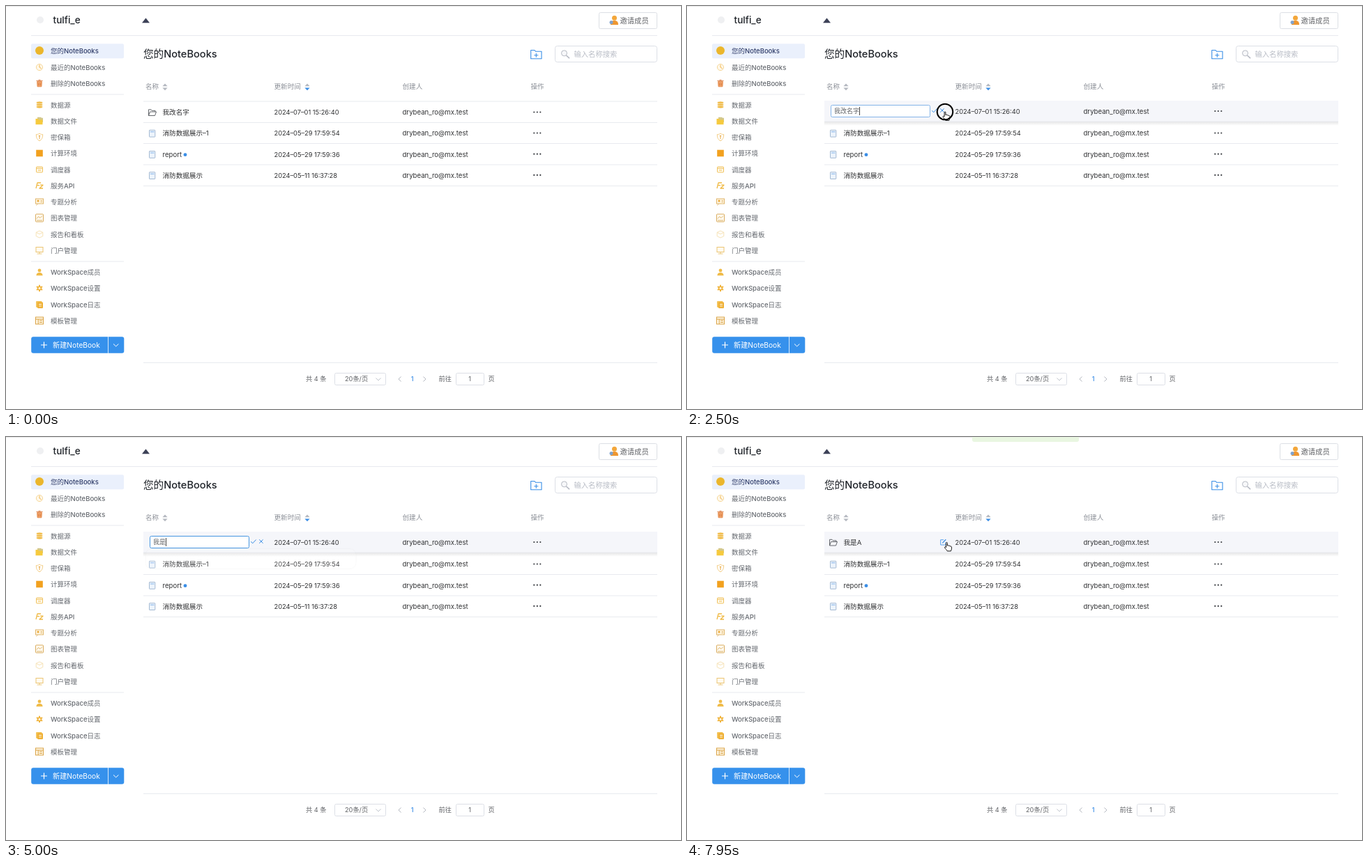
An HTML page for the animation above (8000 ms loop, 968 px wide and 579 px high).

```html
<!DOCTYPE html>
<html lang="zh-CN">
<head>
<meta charset="utf-8">
<title>NoteBooks</title>
<style>
html, body { margin: 0; width: 100%; height: 100%; overflow: hidden; background: #fff; }
svg { display: block; width: 968px; height: 579px; }
text { font-family: Inter, "Noto Sans CJK SC", "Noto Sans CJK", "Noto Sans", sans-serif; }
</style>
</head>
<body>
<svg id="stage" viewBox="0 0 968 579" fill="none"></svg>
<script>
const BLUE = '#3a8ee6', GOLD = '#f0bb48', LOOP = 8000;
const stage = document.getElementById('stage');

// Markup helpers; cy is the vertical middle of the text
const text = (x, cy, s, size = 9.6, fill = '#303133', more = '') =>
  `<text x="${x}" y="${cy + size * 0.36}" font-size="${size}" fill="${fill}" ${more}>${s}</text>`;
const rect = (x, y, w, h, fill, r = 0, stroke = 'none', more = '') =>
  `<rect x="${x}" y="${y}" width="${w}" height="${h}" rx="${r}" fill="${fill}" stroke="${stroke}" ${more}/>`;
const path = (d, stroke, w = 1, fill = 'none') =>
  `<path d="${d}" stroke="${stroke}" stroke-width="${w}" fill="${fill}" stroke-linejoin="round"/>`;
const dot = (x, y, r, fill, stroke = 'none') =>
  `<circle cx="${x}" cy="${y}" r="${r}" fill="${fill}" stroke="${stroke}"/>`;
const hline = (x1, x2, y, c = '#e8eaef') => path(`M${x1} ${y}H${x2}`, c);
const group = (id, body) => `<g id="${id}">${body}</g>`;
const at = (x, y, body) => `<g transform="translate(${x} ${y})">${body}</g>`;

// Sidebar icons, each centred on 0,0
const icons = {
  note: dot(0, 0, 6, '#ebb62c'),
  recent: dot(0, 0, 4.6, '#fff8ea', '#f6d798') + path('M0-3.5V0L2.8 2', '#f0b64d'),
  trash: path('M-3.3-2.3H3.3L2.9 4.8H-2.9Z', '#e58b4b', 1, '#eda068') + path('M-4.6-3.6H4.6M-1.5-4.7H1.5M-1.2 0V2.8M1.2 0V2.8', '#d9773a', 0.9),
  data: [-3, 0, 3].map(y => `<ellipse cx="0" cy="${y}" rx="4.5" ry="1.9" fill="${GOLD}" stroke="#fff" stroke-width=".5"/>`).join(''),
  files: path('M-3-5.2H2L3-4.2H5V2H-3Z', 'none', 0, '#d3c88c') + path('M-5.5-3H-2L-1-1.6H4.5V5.3H-5.5Z', 'none', 0, '#f6ca3e'),
  safe: path('M0-5.2C2-4 3.5-4 4.7-4C4.8 1 3 4 0 5.3C-3 4-4.8 1-4.7-4C-3.5-4-2-4 0-5.2Z', '#f2c878', 0.9) + path('M0-2V2.5M-1.2-2H1.2', '#e6a33a'),
  env: rect(-4.8, -4.8, 9.6, 9.6, '#f2a11f'),
  plan: rect(-4.5, -4, 9, 8, '#fff8e8', 1, '#f0c35f') + path('M-4.5-1.8H4.5M-2 1H2', '#f0c35f'),
  api: path('M-5 4L-3-4H2M-4-.3H0M1-.8H5L0 4H5', '#efb944', 1.3),
  topic: rect(-5.5, -4.5, 11, 7, '#fff6e2', 0, '#dfb468') + dot(-2, -1.5, 1.5, '#e9a42f') + path('M-4.5 5L-2.5 2.5M1.5-2H4M1.5 0H4', '#dfb468', 0.9),
  chart: rect(-5.5, -5.5, 11, 11, '#fffaf0', 1, '#d9ac5f') + path('M-4 1L-1.5-2L1 0L4-3M-4 3.5H4', '#d9ac5f', 0.9),
  board: path('M0-5L4.8-2.7V2.7L0 5L-4.8 2.7V-2.7ZM-4.8-2.7L0-.3L4.8-2.7', '#f5dfae', 0.9),
  portal: rect(-5, -4.5, 10, 7, '#fffaf0', 0, '#ecc574') + path('M0 2.5V5M-3.5 5H3.5', '#ecc574'),
  person: dot(0, -2.6, 2.4, GOLD) + path('M-4.6 4.8C-4.4 1.5-2.5.5 0 .5S4.4 1.5 4.6 4.8Z', 'none', 0, GOLD),
  gear: path('M0-3V3M-2.6-1.5L2.6 1.5M-2.6 1.5L2.6-1.5', '#f0b33a', 2.8) + path('M0-4.8V4.8M-4.1-2.4L4.1 2.4M-4.1 2.4L4.1-2.4', '#f0b33a', 1.9) + dot(0, 0, 1.5, '#fff'),
  log: rect(-5, -5, 8.5, 9, '#f4c45a', 1) + rect(-3, -3.5, 8, 8.8, '#efb034', 1) + path('M-1-.5H3M-1 2H3', '#fff', 0.9),
  layout: rect(-5.5, -5, 11, 10, '#fff8e8', 0, '#d9a142') + path('M-5.5-2H5.5M-1.8-2V5M0 0H4M0 2.5H4', '#d9a142')
};
const menu = [
  [64, 'note', '您的NoteBooks'], [88, 'recent', '最近的NoteBooks'], [111, 'trash', '删除的NoteBooks'],
  [142, 'data', '数据源'], [165, 'files', '数据文件'], [188.5, 'safe', '密保箱'], [211.5, 'env', '计算环境'],
  [235, 'plan', '调度器'], [258, 'api', '服务API'], [281.5, 'topic', '专题分析'], [304.5, 'chart', '图表管理'],
  [328, 'board', '报告和看板'], [351, 'portal', '门户管理'], [382.5, 'person', 'WorkSpace成员'],
  [405.5, 'gear', 'WorkSpace设置'], [429, 'log', 'WorkSpace日志'], [452, 'layout', '模板管理']
];

const header = () =>
  hline(0, 968, 0.5, '#e9e9e9') + dot(49, 20, 5, '#eff0f2') +
  text(67.5, 20.5, 'tulfi_e', 13.6, '#1f2329', 'font-weight="500"') +
  path('M195 24.2H206L200.5 17.3Z', 'none', 0, '#3d4258') +
  rect(850.5, 9.5, 83, 23, '#fff', 2, '#dcdfe4') +
  dot(872.5, 17.2, 3.5, '#f3a73b') +
  path('M867 27C867 22.5 869 21 872.5 21S878 22.5 878 27Z', 'none', 0, '#ee9630') +
  dot(868, 23.5, 2.5, '#7fa3cf') +
  text(880.5, 21, '邀请成员', 10.3, '#606266') + hline(36, 934, 42.5);

const sidebar = () =>
  rect(36, 54.3, 133, 21, '#eaf0fc', 2) +
  menu.map(([y, icon, s], i) => at(48, y, icons[icon]) +
    text(64, y + 0.3, s, 9.5, i ? '#666a70' : '#2f3c68', 'font-weight="500"')).join('') +
  hline(36, 169, 127) + hline(36, 169, 367) +
  rect(36.2, 475.2, 133.1, 23.5, '#3691ec', 3) + path('M146.5 475V499', '#d5e8fb') +
  path('M50 487H59M54.5 482.5V491.5', '#fff', 1.2) +
  text(67, 487, '新建NoteBook', 10.2, '#fff') + path('M154 485.5L157.7 489L161.4 485.5', '#fff');

const sorter = (x, low) => path(`M${x - 3.6} 115.3H${x + 3.6}L${x} 111.6Z`, 'none', 0, '#b4b8c0') +
  path(`M${x - 3.6} 117.6H${x + 3.6}L${x} 121.3Z`, 'none', 0, low);

const sheet = y => rect(205.5, y - 4.7, 8.3, 9.8, '#edf4fc', 0.5, '#a3b9d3') +
  path(`M207 ${y - 2.2}H212.5`, '#7fb0e8');

const cells = (y, date) => text(384.5, y, date, 9.25) + text(568.5, y, 'drybean_ro@mx.test') +
  [757.3, 761.8, 766.3].map(x => dot(x, y - 0.5, 1.1, '#3a3d42')).join('');

const rule = y => hline(197, 934, y, '#e8eaef');

const main = () =>
  text(197, 69, '您的NoteBooks', 14.6, '#1f2329', 'font-weight="500"') +
  path('M752.7 63.5H758L759.5 65.3H768V75.8H752.7ZM760.3 67.7V73.7M757.3 70.7H763.3', BLUE, 1.1) +
  rect(787.5, 57.5, 146, 23, '#fff', 3, '#dcdfe6') +
  dot(800.5, 67.8, 4, '#f7f8fa', '#b5b9c2') + path('M803.5 71L808 75.2', '#b5b9c2', 1.6) +
  text(814.5, 69.3, '输入名称搜索', 10.3, '#b9bdc6') +
  [[200, '名称'], [384.5, '更新时间'], [568.5, '创建人'], [752.5, '操作']].map(([x, s]) => text(x, 116, s, 9.6, '#8b8f97')).join('') +
  sorter(228, '#b4b8c0') + sorter(432, BLUE) +
  [137, 197.5, 228, 258.5].map(rule).join('') +
  [[183, '消防数据展示–1', '2024–05–29 17:59:54'], [213.2, 'report', '2024–05–29 17:59:36'], [243.4, '消防数据展示', '2024–05–11 16:37:28']]
    .map(([y, s, d]) => sheet(y) + text(224.5, y, s) + cells(y, d)).join('') +
  dot(257, 213.7, 2.4, BLUE);

const pager = () => {
  const grey = '#606266';
  return hline(197, 934, 512.5) + text(430, 536, '共 4 条', 9.2, grey) +
    rect(471.5, 527.5, 73, 17, '#fff', 2, '#dcdfe6') + text(486, 536, '20条/页', 9.2, grey) +
    path('M530.5 534.5L534 538L537.5 534.5', '#c0c4cc') +
    path('M566.5 532.5L563 536L566.5 539.5M598.5 532.5L602 536L598.5 539.5', '#b4b8c0') +
    text(580.7, 536, '1', 9.2, BLUE, 'font-weight="500"') + text(620.5, 536, '前往', 9.2, grey) +
    rect(645.5, 527.5, 40, 17, '#fff', 2, '#dcdfe6') + text(663.3, 536, '1', 9.2, grey) + text(691.5, 536, '页', 9.2, grey);
};

const firstRow = () =>
  group('hover', rect(197, 136, 737, 30, '#f5f6fa', 0, 'none', 'id="tint"') + rect(197, 166, 737, 6, 'url(#shade)')) +
  group('row', rule(167.5) +
    group('label', path('M204.5 157.5V148.8H208L209.3 150.3H214V152M204.5 157.5L206.5 152H215.5L213.5 157.5Z', '#55585e', 0.9) +
      text(224.5, 153, '', 9.6, '#303133', 'id="name"')) +
    cells(153, '2024–07–01 15:26:40')) +
  group('pen', path('M368 147.7H363.7V155H371V151', '#5aa2ee') + path('M366.3 152.4L371.2 147.3', BLUE, 1.3)) +
  group('editor', rect(206.5, 142.5, 142, 17, '#fff', 2, BLUE, 'id="box"') +
    rect(211, 145, 37, 12, '#b4d5fe', 0, 'none', 'id="pick"') +
    text(211, 151, '', 9, '#606266', 'id="typed"') +
    group('caret', path('M0 145V157', '#333', 0.9)) +
    path('M351.3 150.2L353.7 152.8L358.6 147.5M363.2 147.3L368.6 152.7M368.6 147.3L363.2 152.7', BLUE, 1)) +
  group('ime', rect(200, 160.5, 302, 29, '#fff', 9, '#d4d4d4') +
    group('choices', rect(204, 164.5, 38, 21, '#3478f6', 5) +
      text(210, 175, '', 11, '#fff', 'id="best"') + text(252, 175, '', 11, '#333', 'id="others"')));

const pointers = () =>
  group('arrow', path('M0 0V10.4L2.4 8.2L4 11.8L5.9 11L4.3 7.5H7.5Z', '#fff', 0.8, '#000')) +
  group('hand', at(-3.5, -0.6, path('M2.6 7.6V1.5C2.6 .2 4.4 .2 4.4 1.5V5.2C5 4.4 6.4 4.6 6.6 5.6C7.3 5 8.5 5.3 8.6 6.3C9.4 5.9 10.5 6.3 10.5 7.4V9.5C10.5 11 9.6 11.6 9.4 13H4.2C4 11.5 1.6 10 .6 8.2C0 7 1.4 6.3 2.6 7.6Z', '#111', 1, '#fff'))) +
  group('beam', path('M-2-5.2C-.8-5.2 0-5 0-4C0-5 .8-5.2 2-5.2M0-4.5V4.5M-2 5.2C-.8 5.2 0 5 0 4C0 5 .8 5.2 2 5.2', '#222')) +
  group('ring', '<circle r="11.3" stroke="#000" stroke-width="2"/>');

stage.innerHTML =
  '<defs><linearGradient id="shade" x1="0" y1="0" x2="0" y2="1"><stop stop-color="#000" stop-opacity=".1"/><stop offset="1" stop-color="#000" stop-opacity="0"/></linearGradient></defs>' +
  header() + sidebar() + main() + pager() + firstRow() +
  rect(409, -30, 153, 37, '#e9f6e1', 3, 'none', 'id="toast"') + pointers();

const el = {};
stage.querySelectorAll('[id]').forEach(n => el[n.id] = n);

const ramp = (t, a, b) => {
  const u = Math.min(1, Math.max(0, (t - a) / (b - a)));
  return u * u * (3 - 2 * u);
};
const within = (t, a, b) => t >= a && t < b;
const show = (node, on) => { node.style.display = on ? '' : 'none'; };
const mix = (a, b, u) => `rgb(${a.map((v, i) => Math.round(v + (b[i] - v) * u))})`;
const last = (keys, t) => keys.filter(k => k[0] <= t).pop();

const typing = [
  [0, '我改名字'], [3650, ''], [4100, 'w'], [4150, 'wo'], [4250, '我'],
  [4800, '我s'], [4850, '我sh'], [4900, '我shi'], [4950, '我是'], [5850, '我是A']
];
const moves = [
  [550, 852, 400], [1150, 608, 300], [1300, 608, 300], [1550, 371, 153], [1700, 370, 152],
  [2850, 370, 152], [3050, 308, 148], [7350, 308, 148], [7450, 330, 124], [7600, 366, 126],
  [7750, 376, 154], [7900, 376, 154], [7950, 372.5, 151.5]
];
const caretOff = [[4050, 4100], [4600, 4800], [5350, 5650]];

function pointerAt(t) {
  const i = moves.findIndex(k => k[0] > t);
  if (i < 0) return moves[moves.length - 1].slice(1);
  const a = moves[Math.max(0, i - 1)], b = moves[i], u = ramp(t, a[0], b[0]);
  return [a[1] + (b[1] - a[1]) * u, a[2] + (b[2] - a[2]) * u];
}

function drawRow(t) {
  const hover = ramp(t, 1850, 2050) - ramp(t, 7450, 7530) + ramp(t, 7620, 7750);
  const chosen = ramp(t, 2880, 3050) - ramp(t, 3150, 3400);
  const editing = within(t, 2500, 6350);
  el.hover.setAttribute('opacity', hover);
  el.tint.setAttribute('fill', mix([245, 246, 250], [251, 244, 225], chosen));
  el.row.setAttribute('transform', `translate(0 ${-1.5 * hover})`);
  el.name.textContent = t < 6350 ? '我改名字' : '我是A';
  show(el.label, !editing);
  show(el.pen, !editing && hover > 0.3);
  show(el.editor, editing);
  return editing;
}

function drawInput(t) {
  const value = last(typing, t)[1];
  el.typed.textContent = value || '请输入';
  el.typed.setAttribute('fill', value ? '#606266' : '#c0c4cc');
  el.box.setAttribute('stroke', mix([132, 180, 232], [70, 150, 225], ramp(t, 3100, 3300)));
  const x = value ? 211.5 + el.typed.getComputedTextLength() : 211.5;
  el.caret.setAttribute('transform', `translate(${x} 0)`);
  const picked = within(t, 3200, 3650);
  show(el.pick, picked);
  show(el.caret, !picked && !caretOff.some(([a, b]) => within(t, a, b)));
}

function drawIme(t) {
  const second = t > 4700;
  const open = within(t, 4100, 4250) || within(t, 4800, 4950);
  const fading = within(t, 4250, 4350) || within(t, 4950, 5100);
  el.ime.setAttribute('opacity', open ? 1 : fading ? 0.12 : 0);
  show(el.choices, open);
  el.best.textContent = second ? '1 是' : '1 我';
  el.others.textContent = second ? '2 时 3 事 4 使 5 十 6 市' : '2 握 3 窝 4 卧 5 沃 6 涡';
}

function drawPointer(t) {
  const [x, y] = pointerAt(t);
  const kind = t < 550 || within(t, 3650, 7350) ? ''
    : within(t, 1900, 2850) || t >= 7700 ? 'hand'
    : within(t, 2850, 3650) ? 'beam' : 'arrow';
  for (const k of ['arrow', 'hand', 'beam', 'ring']) {
    el[k].setAttribute('transform', `translate(${x} ${y})`);
    show(el[k], k === kind);
  }
  show(el.ring, within(t, 2400, 2550) || within(t, 3050, 3250));
}

function draw(t) {
  if (drawRow(t)) drawInput(t);
  drawIme(t);
  el.toast.setAttribute('transform', `translate(0 ${-8 * (1 - ramp(t, 6650, 6850))})`);
  drawPointer(t);
}

const start = performance.now();
function tick() {
  draw((performance.now() - start) % LOOP);
  requestAnimationFrame(tick);
}
tick();
</script>
</body>
</html>
```
